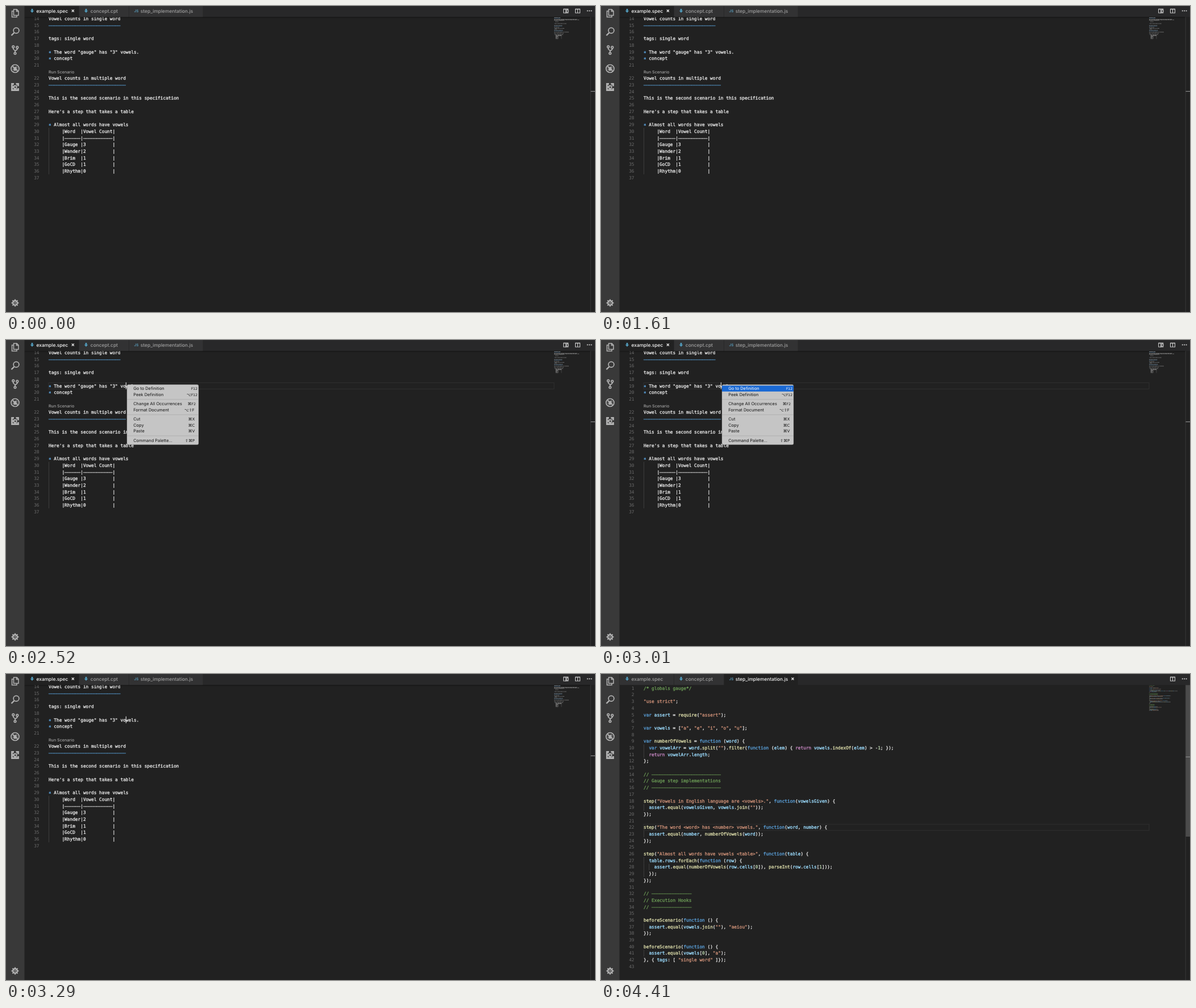
An HTML page that plays this animation: 1037x540 px, repeating every 4.55 s.

```html
<!DOCTYPE html>
<html lang="en">
<head>
<meta charset="utf-8">
<title>Go to definition</title>
<style>
  html, body { margin: 0; width: 100%; height: 100%; overflow: hidden; background: #212121; }
  svg { display: block; }
  text { white-space: pre; text-rendering: geometricPrecision; }
  .code { font: 7.79px "DejaVu Sans Mono", monospace; }
  .code tspan { stroke: currentColor; stroke-width: .32px; fill: currentColor; }
  .num { fill: #6c6c6c; text-anchor: end; }
  .ui { font-family: Inter, "Open Sans", sans-serif; }
  .tab { font-size: 8.4px; font-weight: 500; }
  .lens { font-size: 7.13px; font-weight: 500; }
  .js { font-size: 6.3px; font-weight: 600; }
  .menu { font-size: 7.45px; }
  .key { font: 6.9px "DejaVu Sans", sans-serif; text-anchor: end; }
  .small { font-size: 6px; }
  .icon { fill: none; stroke: #b2b2b2; stroke-width: 1.7; }
</style>
</head>
<body>
<svg id="stage" width="1037" height="540" viewBox="0 0 1037 540"></svg>
<script>
const LOOP = 4550;
const TIMES = { menu: 1820, hover: 2660, pick: 3220, jump: 3640, tab: 3780, blink: 4060 };
const LINE = 11.69, CHAR = 4.69, LEFT = 75;
const BG = '#212121', TEXT = '#e6e6e6', BLUE = '#5a9fd8', INK = '#151515';

const SPEC = `Specification Heading
=====================

This is an executable specification file. This file follows markdown syntax.
Every heading in this file denotes a scenario. Every bulleted point denotes a step.
To execute this specification, run

    gauge spec


* Vowels in English language are "aeiou".


Vowel counts in single word
---------------------------

tags: single word

* The word "gauge" has "3" vowels.
* concept

Vowel counts in multiple word
-----------------------------

This is the second scenario in this specification

Here's a step that takes a table

* Almost all words have vowels
     |Word  |Vowel Count|
     |------|-----------|
     |Gauge |3          |
     |Wander|2          |
     |Brim  |1          |
     |GoCD  |1          |
     |Rhythm|0          |
`.split('\n');

const CODE = `/* globals gauge*/

"use strict";

var assert = require("assert");

var vowels = ["a", "e", "i", "o", "u"];

var numberOfVowels = function (word) {
  var vowelArr = word.split("").filter(function (elem) { return vowels.indexOf(elem) > -1; });
  return vowelArr.length;
};

// --------------------------
// Gauge step implementations
// --------------------------

step("Vowels in English language are <vowels>.", function(vowelsGiven) {
  assert.equal(vowelsGiven, vowels.join(""));
});

step("The word <word> has <number> vowels.", function(word, number) {
  assert.equal(number, numberOfVowels(word));
});

step("Almost all words have vowels <table>", function(table) {
  table.rows.forEach(function (row) {
    assert.equal(numberOfVowels(row.cells[0]), parseInt(row.cells[1]));
  });
});

// ---------------
// Execution Hooks
// ---------------

beforeScenario(function () {
  assert.equal(vowels.join(""), "aeiou");
});

beforeScenario(function () {
  assert.equal(vowels[0], "a");
}, { tags: [ "single word" ]});
`.split('\n');

const esc = s => s.replace(/&/g, '&amp;').replace(/</g, '&lt;');
const rect = (x, y, w, h, fill, extra = '') =>
  `<rect x="${x}" y="${y}" width="${w}" height="${h}" fill="${fill}" ${extra}/>`;
const label = (x, y, s, cls, fill) =>
  `<text x="${x}" y="${y}" class="${cls}" ${fill ? `fill="${fill}"` : ''}>${esc(s)}</text>`;
const group = (id, body) => `<g id="${id}">${body}</g>`;
const path = (d, extra = '') => `<path d="${d}" ${extra}/>`;

// Tokens are [text, colour] pairs.
function specTokens(line) {
  if (/^(-+|=+)$/.test(line)) return [[line, BLUE]];
  if (line[0] === '*') return [['∗', BLUE], [line.slice(1), TEXT]];
  return [[line, TEXT]];
}

const SYNTAX = /(\/[*\/].*)|("[^"]*")|\b(var|function)\b|\b(return)\b|(\d+)|([A-Za-z]\w*)(?=\s*\(| = function)|([A-Za-z]\w*)|([^"\w\/]+)/g;
const COLOURS = ['#6a9955', '#ce9178', BLUE, '#c586c0', '#b5cea8', '#dcdcaa', '#9cdcfe', TEXT];
const codeTokens = line => [...line.matchAll(SYNTAX)].map(m =>
  [m[0], COLOURS[m.slice(1).findIndex(g => g !== undefined)]]);

const joinDashes = s => s.replace(/-{3,}/g, run => '–'.repeat(run.length));

function textLine(tokens, n, y) {
  const spans = tokens.map(([s, c]) => `<tspan color="${c}">${esc(joinDashes(s))}</tspan>`).join('');
  return label(58.5, y + 2.8, String(n), 'code num') +
    `<text x="${LEFT}" y="${y + 2.8}" class="code">${spans}</text>`;
}

function minimap(lines, tokenize) {
  let out = '';
  lines.forEach((line, i) => {
    let col = 0;
    for (const [s, colour] of tokenize(line)) {
      for (const m of s.matchAll(/\S+/g))
        out += rect(965 + (col + m.index) * .53, 20 + i * 1.07, m[0].length * .53, .7, colour, 'opacity=".5"');
      col += s.length;
    }
  });
  return out;
}

const guide = (col, y, rows) => rect(LEFT + col * CHAR, y - LINE / 2, .8, rows * LINE, '#464646');
const lineBox = y => rect(75, y - 5.4, 890, 11, 'none', 'stroke="#303030"');
const caret = (x, y) => rect(x, y - 6, 1.1, 12, '#e8e8e8');

// An extra row is left above line 22 for the code lens.
const specY = n => 34 + (n - 15 + (n > 21)) * LINE;
const codeY = n => 25 + (n - 1) * LINE;

function specView() {
  let out = guide(0, specY(30), 7);
  for (let n = 14; n <= SPEC.length; n++) out += textLine(specTokens(SPEC[n - 1]), n, specY(n));
  return out + label(LEFT, 119.1, 'Run Scenario', 'ui lens', '#a4a4a4') +
    rect(33, 19, 996, 3, 'url(#shade)') + minimap(SPEC, specTokens);
}

function codeView() {
  let out = '';
  CODE.forEach((line, i) => {
    const indent = line.search(/\S/), y = codeY(i + 1);
    for (let col = 0; col < indent; col += 2) out += guide(col, y, 1);
    out += textLine(codeTokens(line), i + 1, y);
  });
  return lineBox(codeY(22)) + out + minimap(CODE, codeTokens);
}

const arrow = x => path(`M${x - 1.4} 5h2.8v3.2h1.9L${x} 12L${x - 3.3} 8.2h1.9z`, 'fill="#519aba"');
const cross = x => path(`M${x - 2} 6.5l4 4m0-4l-4 4`, 'stroke="#e8e8e8" stroke-width="1.3"');

function tabs(active) {
  const list = [
    [33, 95, 'example.spec', 53.5, arrow(46)],
    [129, 87, 'concept.cpt', 148.8, arrow(141)],
    [217, 129.5, 'step_implementation.js', 236.8, label(225.6, 11, 'JS', 'ui js', '#5a9fc0')]];
  return rect(33, 0, 1004, 19.3, '#282829') + list.map(([x, w, name, textX, icon], i) =>
    rect(x, 0, w, 19.3, i === active ? BG : '#323233') +
    label(textX, 11.5, name, 'ui tab', i === active ? '#f8f8f8' : '#a0a0a0') + icon
  ).join('') + cross(active ? 337.5 : 117.8);
}

const splitIcon = (x, extra = '') =>
  `<g fill="none" stroke="#c8c8c8" stroke-width="1.1">${path(`M${x - 4} 5.2h8v7h-8zM${x} 5v7M${x - 4} 5.7h8`)}${extra}</g>`;
const previewIcon = splitIcon(985.7, '<circle cx="988.2" cy="9" r="1.9" fill="#282829"/>' + path('M987 10.5l-2 2.3'));
const dots = [1023.8, 1027.2, 1030.6].map(x => `<circle cx="${x}" cy="8.5" r="1.1" fill="#d0d0d0"/>`).join('');

function activityBar() {
  const ring = (x, y, r) => `<circle cx="${x}" cy="${y}" r="${r}"/>`;
  const teeth = [0, 45, 90, 135].map(a => path('M16 517.6v12.8', `transform="rotate(${a} 16 524)" stroke-width="2.2"`)).join('');
  return rect(0, 0, 32.5, 540, '#393939') + `<g class="icon">` +
    path('M13.5 6h5.5l3 3v7.5h-8.5zM18.5 6v3.5h3.5M13 9h-2.5v10.5h8.5v-2.5', 'stroke-width="1.5"') +
    ring(18, 43.3, 4.9) + path('M14.5 47l-5 5', 'stroke-width="2.4"') +
    ring(12.8, 72, 1.8) + ring(19.8, 73, 1.8) + ring(16, 83.6, 1.8) +
    path('M12.8 74v2l3.2 3v2.8M19.8 75v1.5l-3.8 3') +
    ring(16, 110.5, 7) + path('M11.2 105.5l9.8 9.8') +
    `<ellipse cx="16" cy="111" rx="2.5" ry="3.6" fill="#b2b2b2" stroke="none"/>` +
    path('M11.5 109h9M11.5 112h9M13 115l2-2M17 108l2-2', 'stroke-width="1"') +
    path('M14 137.5h-3.5v11h11v-3.5M17.5 137.5h4v4M10.5 143h3.5M16 148.5v-3', 'style="stroke-width:2.8px"') +
    path('M14 141h4.5v4.5h-4.5z', 'style="stroke-width:1.8px"') +
    teeth + `<circle cx="16" cy="524" r="3.7" fill="#393939" style="stroke-width:2.4px"/>` +
    `</g>` + `<circle cx="16" cy="524" r="1.2" fill="#b2b2b2"/>`;
}

const firstItem = colour =>
  label(224.2, 88.2, 'Go to Definition', 'ui menu', colour) +
  `<g class="key">${label(337, 88.2, 'F12', 'small', colour)}</g>`;

function contextMenu() {
  const items = [[96, 'Peek Definition', '⌥', 'F12', 337], [112.6, 'Change All Occurrences', '⌘', 'F2', 334],
    [123, 'Format Document', '⌥⇧F', '', 331.8], [139.7, 'Cut', '⌘X', '', 332.4], [150, 'Copy', '⌘C', '', 332.4],
    [160.3, 'Paste', '⌘V', '', 332.4], [177, 'Command Palette...', '⇧⌘P', '', 332.2]];
  return rect(213, 78.7, 126, 106, '#c5c5c5', 'rx="2.5" stroke="#8e8e8e" stroke-width=".4"') +
    [104.4, 131.4, 168.6].map(y => rect(213, y, 126, .9, '#adadad')).join('') +
    items.map(([y, name, symbols, small, x]) =>
      label(224.2, y + 2.7, name, 'ui menu', INK) +
      `<text x="${x}" y="${y + 2.7}" class="key" fill="${INK}">${symbols}<tspan class="small">${small}</tspan></text>`).join('') +
    group('idle', firstItem(INK)) +
    group('hover', rect(213, 80.5, 126, 10.4, '#1a69d4') + firstItem('#ffffff'));
}

const rulerMark = y => rect(1029.5, y, 7.5, 1.2, '#8c8c8c');

document.getElementById('stage').innerHTML =
  `<defs><linearGradient id="shade" x2="0" y2="1"><stop stop-opacity=".45"/><stop offset="1" stop-opacity="0"/></linearGradient></defs>` +
  rect(0, 0, 1037, 540, BG) +
  group('lineBox', lineBox(specY(19))) +
  group('spec', specView()) +
  group('code', codeView()) +
  group('specCaret', caret(210.8, specY(19))) +
  group('codeCaret', caret(LEFT, codeY(22))) +
  group('tabsSpec', tabs(0) + previewIcon) + group('tabsCode', tabs(2)) +
  splitIcon(1006.5) + dots +
  rect(1028.7, 19.3, .9, 521, '#3a3a3a') +
  group('slider', rect(1029.5, 19.5, 7.5, 267.5, '#4b4b4b')) +
  group('markStart', rulerMark(150)) + group('markSpec', rulerMark(143.8)) + group('markCode', rulerMark(145.8)) +
  activityBar() +
  group('menu', contextMenu());

function show(id, visible) {
  document.getElementById(id).style.display = visible ? '' : 'none';
}

function render(t) {
  const within = (from, to) => t >= from && t < to;
  const { menu, hover, pick, jump, tab, blink } = TIMES;
  show('spec', t < jump);
  show('code', t >= jump);
  show('menu', within(menu, pick));
  show('lineBox', within(menu, pick));
  show('idle', t < hover);
  show('hover', t >= hover);
  show('specCaret', within(menu, jump));
  show('codeCaret', within(jump, blink));
  show('markStart', t < menu);
  show('markSpec', within(menu, jump));
  show('markCode', t >= jump);
  show('tabsSpec', t < tab);
  show('tabsCode', t >= tab);
  show('slider', t >= tab);
}

const start = performance.now();
function tick() {
  render((performance.now() - start) % LOOP);
  requestAnimationFrame(tick);
}
tick();
</script>
</body>
</html>
```
